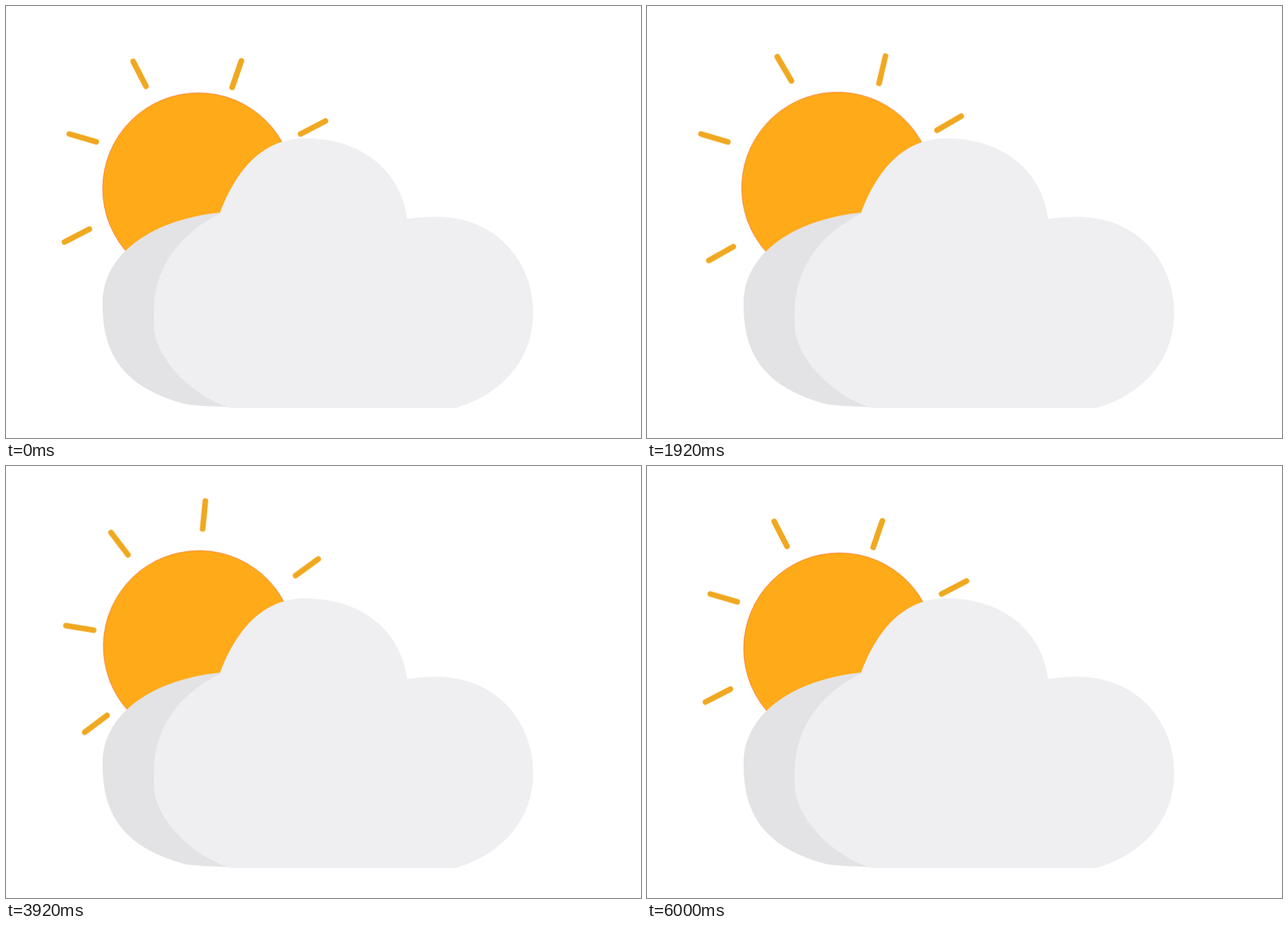
Animation of 907 by 617 pixels, one loop 6040 ms. Source, as an HTML page without scripts:

```html
<!DOCTYPE html>
<html lang="en">
<head>
<meta charset="utf-8">
<title>Sun behind a cloud</title>
<style>
  html, body { margin: 0; width: 100%; height: 100%; overflow: hidden; background: #fff; }
  svg { display: block; width: 907px; height: 617px; }

  .spin, .pulse, .bob, .glow { animation: 6.04s infinite; }
  .spin, .pulse, .bob { animation-timing-function: cubic-bezier(.3333, 0, .6667, 1); }
  .spin { animation-name: spin; }
  .pulse { animation-name: pulse; }
  .bob { animation-name: bob; }
  .glow { animation-name: glow; animation-timing-function: ease-in-out; }

  /* 99.338% is the 6 s mark; the rest holds one 40 ms step */
  @keyframes spin {
    0% { transform: rotate(0deg); }
    99.338%, 100% { transform: rotate(360deg); }
  }
  @keyframes pulse {
    0%, 33.113%, 66.225%, 99.338%, 100% { transform: scale(1); }
    16.556%, 49.669%, 82.781% { transform: scale(1.024); }
  }
  @keyframes bob {
    0%, 33.113%, 66.225%, 99.338%, 100% { transform: translateY(0); }
    16.556%, 49.669%, 82.781% { transform: translateY(2.7px); }
  }
  @keyframes glow {
    0%, 42.5%, 60%, 100% { opacity: 0; }
    49.669%, 52% { opacity: 1; }
  }

  .rays { stroke: #f0a820; stroke-width: 8; stroke-linecap: round; }
  .disc { fill: #ffaa18; stroke: #f2541f; stroke-width: .6; }
  .back { fill: #e3e2e5; }
  .front { fill: #efeef1; }
</style>
</head>
<body>
<svg viewBox="0 0 907 617" xmlns="http://www.w3.org/2000/svg">
  <defs>
    <radialGradient id="warm">
      <stop offset="0" stop-color="#ffbd16"/>
      <stop offset=".65" stop-color="#ffb817"/>
      <stop offset="1" stop-color="#ffac18"/>
    </radialGradient>
    <path id="ray" d="M0-20V20"/>
  </defs>

  <g transform="translate(274 258.8)">
    <g class="spin">
      <circle class="disc" cx=".9" cy="2" r="136.8"/>
      <circle class="glow" cx=".9" cy="2" r="136.4" fill="url(#warm)"/>
      <g class="rays pulse">
        <use href="#ray" transform="rotate(-111.8) translate(0 -186) rotate(-5.7)"/>
        <use href="#ray" transform="rotate(-66.8) translate(0 -178.8) rotate(-7)"/>
        <use href="#ray" transform="rotate(-27.2) translate(0 -182)"/>
        <use href="#ray" transform="rotate(19) translate(0 -170.8)"/>
        <use href="#ray" transform="rotate(62.6) translate(0 -185.3)"/>
        <use href="#ray" transform="rotate(102.4) translate(0 -189) rotate(3)"/>
        <use href="#ray" transform="rotate(153.5) translate(0 -193)"/>
        <use href="#ray" transform="rotate(204.5) translate(0 -191) rotate(-5)"/>
      </g>
    </g>
  </g>

  <g class="bob">
    <path class="back" d="M306 295C215 304 138 350 138 425V430C139 505 175 547 258 569
      C275 571 300 572 322 573L400 560V295Z"/>
    <path class="front" d="M305 297C328 235 366 189 427 189C508 189 564 235 573 304
      C587 302 601 301 615 301C700 301 753 365 753 438C753 503 711 554 642 574
      H322L318 573C262 555 211 500 211 455V437C211 375 247 325 305 297Z"/>
  </g>
</svg>
</body>
</html>
```
